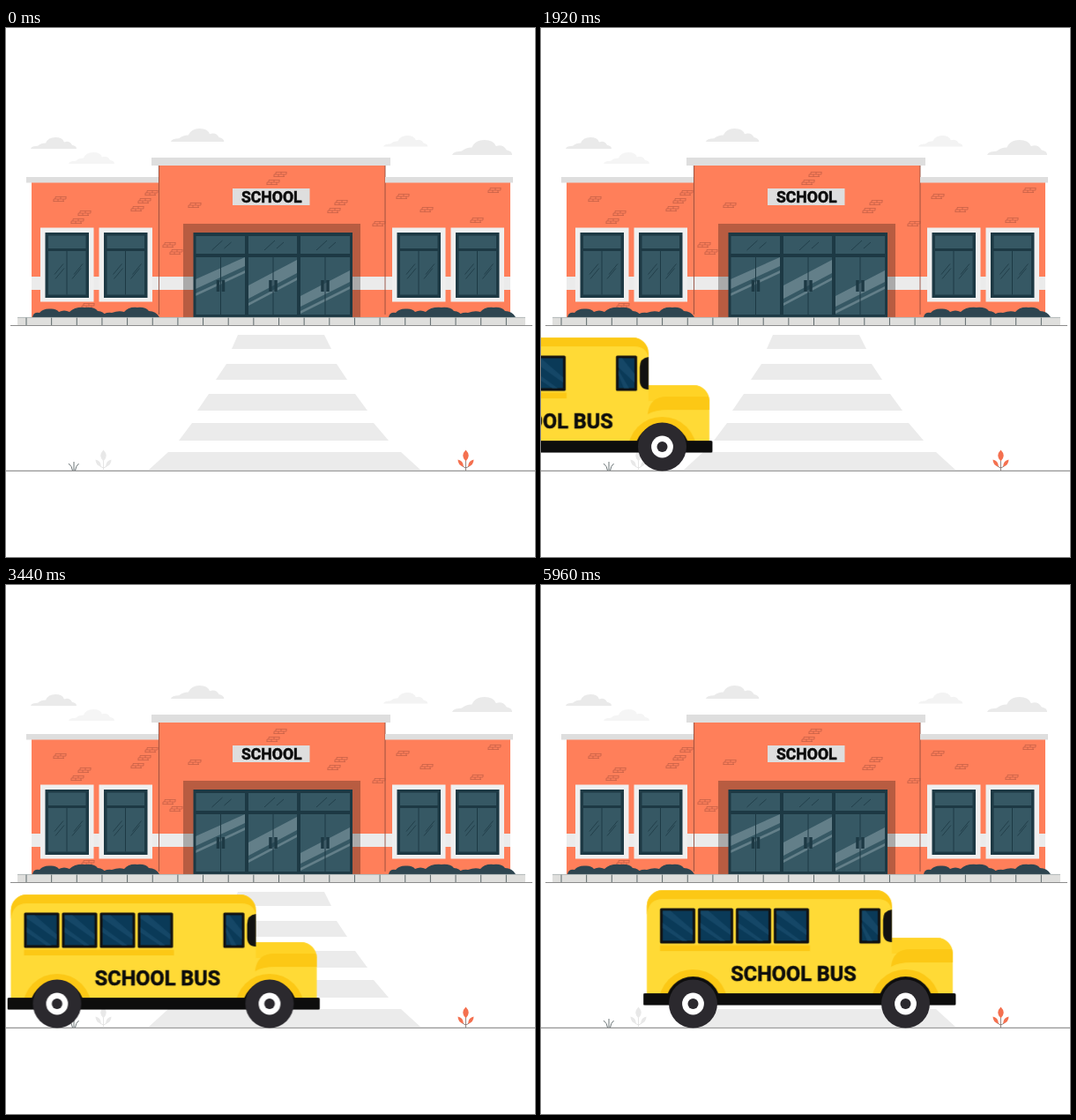
Animation of 600 by 600 pixels, one loop 6.04 s. Source, as an HTML page:

```html
<!DOCTYPE html>
<html lang="en">
<head>
<meta charset="utf-8">
<title>School bus stop</title>
<style>
  html, body { margin: 0; width: 100%; height: 100%; overflow: hidden; background: #fff; }
  svg { display: block; width: 100vw; height: 100vh; }
  text {
    font-family: Roboto, Arial, sans-serif; font-weight: 700; text-anchor: middle;
    fill: #0c0c0c; stroke: #0c0c0c; stroke-width: .5px;
  }
  #bus { animation: drive 6040ms linear infinite; }
  #body { animation: bob 6040ms infinite; }
  /* the bus rolls in until 4520 ms, then waits */
  @keyframes drive {
    0% { transform: translateX(-480px); }
    74.834%, 100% { transform: translateX(0); }
  }
</style>
</head>
<body>
<svg viewBox="0 0 600 600">
  <defs>
    <path id="cloud" d="M0 12Q1 9 8 9Q12 6 17 6Q20 0 28 0Q36 0 38 5Q44 3 47 8Q52 9 52 12Z"/>
    <path id="brick" d="M-5 -2.5H7.500M-7 0H7M-7.500 2.500H5M-5 -2.500V0M1 -2.500V0M7 -2.500V0M-7 0V2.500M-2 0V2.500M4 0V2.500"
      fill="none" stroke="#b85a42" stroke-width=".8" opacity=".8"/>
    <g id="window">
      <rect width="60.5" height="84" fill="#efefef"/>
      <rect x="5.5" y="5.5" width="49.5" height="74" fill="#1d3944"/>
      <path d="M9 9H51.5V23.5H9ZM9 26.5H51.5V76H9Z" fill="#365864"/>
      <path d="M30 26.5V76" stroke="#1d3944"/>
      <path d="M16 53L26 41M17 58L27 46M38 53L48 41M36 58L46 46" stroke="#1d3944" stroke-width=".8"/>
    </g>
    <path id="bushes" fill="#2e4550" d="M30 328Q31 322 38 323Q42 318 50 318.500Q57 318 60 322Q66 319 72 322Q78 316 90 317Q100 316 104 321Q111 321 114 328Z
      M108 328Q111 322 120 323Q128 320 134 322Q139 316 149 317Q158 316 162 321Q170 321 174 328Z"/>
    <g id="plant">
      <path d="M0 22V8M0 19Q-5 18 -6 13M0 19Q5 18 6 13" fill="none" stroke="var(--stem)" stroke-width=".9"/>
      <path d="M0 11.500Q-6.500 5 0 -1.500Q6.500 5 0 11.500ZM-2.500 17.500Q-3 10.500 -9 9.500Q-9 16 -2.500 17.500ZM2.500 17.500Q3 10.500 9 9.500Q9 16 2.500 17.500Z" fill="currentColor"/>
    </g>
    <g id="wheel">
      <circle r="27.5" fill="#2b292e"/>
      <circle r="12.4" fill="#fff"/>
      <circle r="6" fill="#2b292e"/>
    </g>
    <path id="glass" d="M215.5 260H271V325H215.5ZM275 260H330V325H275ZM334 260H390V325H334Z"/>
    <clipPath id="glassClip"><use href="#glass"/></clipPath>
    <clipPath id="aboveBase"><rect x="110" y="340" width="370" height="124"/></clipPath>
  </defs>

  <g id="clouds"></g>

  <g id="school">
    <path d="M29 175H173V328H29ZM430 175H572V328H430ZM173 155H430V328H173Z" fill="#ff7f5a"/>
    <path d="M29 282H213V297H29ZM392 282H572V297H392Z" fill="#ebebeb"/>
    <path d="M173.5 156V325M430 156V325" stroke="#934d3e" stroke-width=".9"/>
    <path d="M23 169H173V175.5H23ZM430 169H575V175.5H430ZM165 147H436V156H165Z" fill="#dedede"/>
    <g id="bricks"></g>
    <rect x="257" y="182" width="87.5" height="19" fill="#dedede"/>
    <text x="301.3" y="198" font-size="17.6">SCHOOL</text>

    <rect x="201" y="222" width="201" height="106" opacity=".28"/>
    <rect x="212.5" y="232" width="180.5" height="96" fill="#1d3944"/>
    <path d="M215.5 236H271V256H215.5ZM275 236H330V256H275ZM334 236H390V256H334Z" fill="#365864"/>
    <use href="#glass" fill="#365864"/>
    <g clip-path="url(#glassClip)" fill="#637f89">
      <path d="M215 285L271 260V270L215 296ZM215 301L271 275V278L215 304Z"/>
      <path d="M275 292L330 263V278L275 307ZM275 312L330 283V286L275 315Z"/>
      <path d="M334 304L390 275V288L334 316ZM334 321L390 293V296L334 324Z"/>
    </g>
    <g id="handles" stroke="#1d3944"></g>
    <g id="windows"></g>
    <use href="#bushes"/>
    <use href="#bushes" x="404"/>
    <rect x="13" y="328" width="576" height="9" fill="#dfdfdd"/>
    <path id="curb" stroke="#5d686b" fill="none"/>
    <path d="M13 328.4H589" stroke="#a9b0b0" stroke-width=".8"/>
    <path d="M5 337.5H597" stroke="#8c8c8c"/>
  </g>

  <path fill="#ebebeb" d="M263 348H361L369 364H256ZM250 381H375L387 399H238ZM230 415H396L410 434H217ZM211 448H417L434 468H196ZM184 481H448L470 501H162Z"/>
  <path d="M0 502.3H600" stroke="#777" stroke-width="1.1"/>
  <path d="M75.5 502Q75 497 71 494M77 502V492M78.5 502Q79 497 82.5 494" fill="none" stroke="#6d7678"/>
  <use href="#plant" x="110.5" y="480" color="#e8e8e8" style="--stem: #e4e4e4"/>
  <use href="#plant" x="521.5" y="480" color="#f4704f" style="--stem: #8a7a75"/>

  <g id="bus">
    <g id="body">
      <path d="M120 464V364A18 18 0 0 1 138 346H380A18 18 0 0 1 398 364V400H449A18 18 0 0 1 467 418V464Z" fill="#ffda36"/>
      <path d="M120 374V364A18 18 0 0 1 138 346H380A18 18 0 0 1 398 364V370Q396 356 382 356H138Q122 356 120 374Z" fill="#fcc815"/>
      <path d="M398 400H449A18 18 0 0 1 467 418H398Z" fill="#ffd326"/>
      <path d="M397 433Q399 413 419 413H466.300L467 418V428H420Q405 428 397 433Z" fill="#fcc815"/>
      <path d="M135 408.500H305V415H135Z" fill="#fcc815"/>
      <g id="panes"></g>
      <path d="M398 368Q388 369 388 380V394Q388 405 398 405Z" fill="#111"/>
      <text x="286.5" y="449.300" font-size="23.5">SCHOOL BUS</text>
      <g id="arches" clip-path="url(#aboveBase)"></g>
      <rect x="116" y="463" width="354.500" height="13.500" rx="1.500" fill="#0d0d0d"/>
    </g>
    <use href="#wheel" x="172.500" y="475"/>
    <use href="#wheel" x="413.500" y="475"/>
  </g>
</svg>
<script>
  const $ = id => document.getElementById(id);
  const fill = (id, list, draw) => { $(id).innerHTML = list.map(draw).join(''); };

  fill('clouds', [
    [28, 124, 1, '#eaeaea'], [187, 114, 1.16, '#eaeaea'], [71, 141, 1, '#f5f5f5'],
    [428, 122, .97, '#f3f3f3'], [506, 127, 1.31, '#eaeaea']
  ], ([x, y, s, c]) =>
    `<use href="#cloud" transform="translate(${x} ${y}) scale(${s} ${Math.max(1, s * 1.08)})" fill="${c}"/>`);

  fill('bricks', [
    [61, 194], [89, 210], [81, 219], [165, 187], [157, 196], [149, 205], [311, 166], [303, 175],
    [214, 201], [185, 246], [193, 254], [380, 198], [372, 207], [423, 222],
    [450, 191], [477, 206], [554, 184], [534, 218], [93, 315]
  ], ([x, y]) => `<use href="#brick" x="${x}" y="${y}"/>`);

  fill('windows', [39, 105.5, 438, 504.5], x => `<use href="#window" x="${x}" y="226.5"/>`);

  fill('handles', [243.5, 303, 362], x =>
    `<path d="M${x} 260V325"/><path d="M${x - 3} 286V299M${x + 3} 286V299" stroke-width="3.5"/>
     <path d="M${x - 10} 252L${x + 2} 241M${x + 4} 250L${x + 12} 243" stroke-width=".8"/>`);

  $('curb').setAttribute('d', Array.from({ length: 20 }, (_, i) => `M${23 + i * 28.65} 328V337`).join(''));

  fill('arches', [172.5, 413.5], x =>
    `<circle cx="${x}" cy="475" r="39" fill="#fcc815"/><circle cx="${x}" cy="475" r="31" fill="#0d0d0d"/>`);

  fill('panes', [[135, 40], [178, 40], [221, 40], [264, 40], [361, 24]], ([x, w]) => {
    const r = x + w;
    return `<rect x="${x}" y="366.5" width="${w}" height="40" rx="1.5" fill="#111"/>
      <rect x="${x + 3}" y="369.5" width="${w - 6}" height="34" fill="#0a3a58"/>
      <path d="M${x + 3} ${w > 30 ? 373 : 380}V369.5H${x + w * .3}L${r - 3} ${w > 30 ? 391 : 387}V397Z
        M${x + 3} 383L${r - 9} 403.5H${r - 15}L${x + 3} 389Z" fill="#154767"/>`;
  });

  // suspension: fifteen dips while the bus is moving
  const loop = 6040, period = 303, lead = 39;
  let frames = '0% { transform: translateY(1.2px); animation-timing-function: ease; }';
  for (let i = 1; i <= 30; i++) {
    const at = (i * period / 2 - lead) / loop * 100;
    frames += `${at.toFixed(3)}% { transform: translateY(${i % 2 * 5}px); animation-timing-function: ease; }`;
  }
  const sheet = document.createElement('style');
  sheet.textContent = `@keyframes bob { ${frames} 100% { transform: translateY(0); } }`;
  document.head.append(sheet);
</script>
</body>
</html>
```
